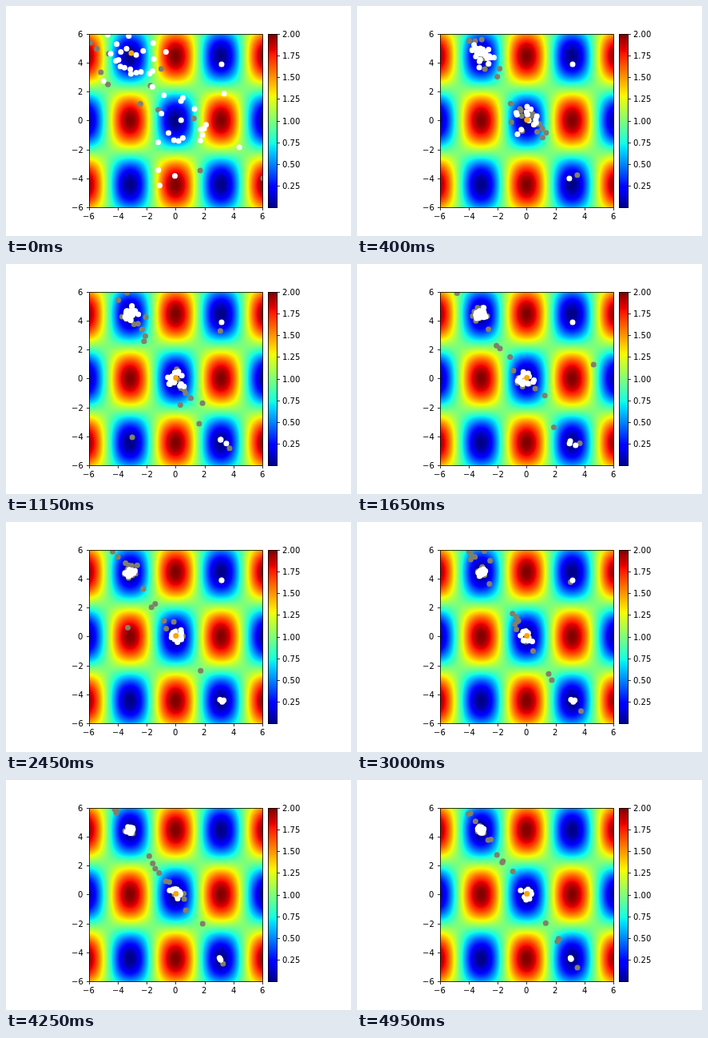
These frames come from a looping animation (432x288 px, 5000 ms). An HTML page with a canvas:

```html
<!DOCTYPE html>
<html lang="en">
<head>
<meta charset="utf-8">
<title>Swarm search</title>
<style>
  html, body { margin: 0; width: 100%; height: 100%; overflow: hidden; background: #fff; }
  canvas, svg { position: absolute; left: 0; top: 0; width: 432px; height: 288px; }
  text { font: 10px "DejaVu Sans", sans-serif; fill: #000; }
  path { fill: none; stroke: #000; stroke-width: .8; }
</style>
</head>
<body>
<canvas id="plot" width="432" height="288"></canvas>
<svg id="axes" viewBox="0 0 432 288"></svg>
<script>
const STEP = 50, STEPS = 100;
const BOX = { x: 104, y: 35, size: 218 };
const CX = 212.37, CY = 143.28, UNIT = 18.12;
const ctx = document.getElementById('plot').getContext('2d');

// Colour map: piecewise linear channels
const ramp = (v, stops) => {
  let i = 1;
  while (i < stops.length - 1 && v > stops[i][0]) i++;
  const [a, p] = stops[i - 1], [b, q] = stops[i];
  return 255 * (p + (q - p) * (v - a) / (b - a));
};
const RED = [[0, 0], [.35, 0], [.66, 1], [.89, 1], [1, .5]];
const GREEN = [[0, 0], [.125, 0], [.375, 1], [.64, 1], [.91, 0], [1, 0]];
const BLUE = [[0, .5], [.11, 1], [.34, 1], [.65, 0], [1, 0]];
const jet = v => [RED, GREEN, BLUE].map(c => ramp(Math.min(1, Math.max(0, v)), c));

const height = (x, y) => 1 + (x * x + y * y) / 4000 - Math.cos(x) * Math.cos(y / Math.SQRT2);

function paint(w, h, value) {
  const img = new ImageData(w, h);
  for (let y = 0; y < h; y++) {
    for (let x = 0; x < w; x++) img.data.set([...jet(value(x, y)), 255], (y * w + x) * 4);
  }
  const layer = document.createElement('canvas');
  layer.width = w;
  layer.height = h;
  layer.getContext('2d').putImageData(img, 0, 0);
  return layer;
}

const field = paint(BOX.size, BOX.size, (x, y) =>
  height((BOX.x + x + .5 - CX) / UNIT, (CY - BOX.y - y - .5) / UNIT) / 2);
const bar = paint(12, BOX.size, (x, y) => 1 - y / BOX.size);

function drawAxes() {
  let lines = 'M104.5 35.5H321.5V252.5H104.5ZM328.5 35.5H339.5V252.5H328.5Z';
  let labels = '';
  const label = (x, y, s) => {
    labels += `<text x="${Math.round(x)}" y="${y}">${s}</text>`;
  };
  for (let v = -6; v <= 6; v += 2) {
    const s = String(v).replace('-', '\u2212');
    const width = v < 0 ? 14.74 : 6.36;
    const x = CX + v * UNIT, y = Math.round(CY - v * UNIT) + .5;
    lines += `M${Math.round(x) + .5} 252.5v3.5M104.5 ${y}h-3.5`;
    label(x - width / 2, 267, s);
    label(96.65 - width, y + 3.5, s);
  }
  for (let v = 1; v <= 8; v++) {
    const y = Math.round(252.2 - v * 27.15) + .5;
    lines += `M339.5 ${y}h3.5`;
    label(346.2, y + 3.5, (v / 4).toFixed(2));
  }
  document.getElementById('axes').innerHTML = `<path d="${lines}"/>${labels}`;
}

const rnd = (a, b = 0) => {
  const v = Math.sin(a * 127.1 + b * 311.7 + 7.3) * 43758.5453;
  return v - Math.floor(v);
};

// Groups of nests, each gathering in one valley of the field
const VX = Math.PI, VY = Math.PI * Math.SQRT2;
const nests = [];
function group(count, x, y, { rest, born = 0, gap = 0 }) {
  for (let i = 0; i < count; i++) {
    nests.push({ x, y, rest, id: nests.length, born: born + i * gap, dies: STEPS });
  }
}
group(24, -VX, VY, { rest: .12 });
group(14, 0, 0, { rest: .22 });
group(3, VX, -VY, { rest: .06, born: 6, gap: 6 });
nests.push({ x: 3.18, y: 3.88, still: true, born: 0, dies: 85 });

// Strays are given up within the first steps
for (let i = 0; i < 8; i++) {
  nests.push({
    x: -4 + 8.5 * rnd(i, 50), y: -5 + 7 * rnd(i, 51),
    still: true, born: 0, dies: 2 + 6 * rnd(i, 52)
  });
}

// A nest jumps ever more rarely and ever closer to the bottom of its valley
function nestAt(nest, step) {
  if (nest.still) return [nest.x, nest.y];
  const phase = rnd(nest.id, 1);
  const jump = Math.floor(2.5 * Math.log2(step + 1) + phase);
  const since = Math.max(0, 2 ** ((jump - phase) / 2.5) - 1);
  const spread = nest.rest + .35 * Math.exp(-since / 22) + .75 * Math.exp(-since / 3);
  const r = spread * Math.sqrt(-2 * Math.log(1 - .9 * rnd(nest.id, 2)));
  const angle = 2 * Math.PI * rnd(nest.id, 10 + jump);
  return [nest.x + r * Math.cos(angle), nest.y + r * Math.sin(angle)];
}

// A scout starts at one nest and goes along the difference of two others
function scoutsAt(settled, step) {
  const count = Math.min(36, 16 + 3 * step);
  return Array.from({ length: count }, (_, i) => {
    const n = step * 40 + i;
    const pick = k => settled[Math.floor(rnd(n, k) * settled.length)];
    const a = pick(20), b = pick(21), c = pick(22), r = rnd(n, 23);
    return [a[0] + r * (b[0] - c[0]), a[1] + r * (b[1] - c[1])];
  });
}

function dots(points, colour) {
  ctx.fillStyle = colour;
  for (const [x, y] of points) {
    ctx.beginPath();
    ctx.arc(CX + x * UNIT, CY - y * UNIT, 3.5, 0, 2 * Math.PI);
    ctx.fill();
  }
}

function draw(step) {
  const settled = nests
    .filter(n => n.born <= step && step < n.dies)
    .map(n => nestAt(n, step));
  const best = step < 4 ? [-3.06, 4.65] : [.02, .04];
  ctx.clearRect(0, 0, 432, 288);
  ctx.drawImage(field, BOX.x, BOX.y);
  ctx.drawImage(bar, 328, BOX.y);
  ctx.save();
  ctx.beginPath();
  ctx.rect(BOX.x, BOX.y, BOX.size, BOX.size);
  ctx.clip();
  dots(scoutsAt(settled, step), '#80806c');
  dots(settled, '#fff');
  dots([best], '#ffa500');
  ctx.restore();
}

drawAxes();
const start = performance.now();
let shown = -1;
function tick() {
  const step = Math.floor((performance.now() - start) / STEP) % STEPS;
  if (step !== shown) draw(shown = step);
  requestAnimationFrame(tick);
}
tick();
</script>
</body>
</html>
```
